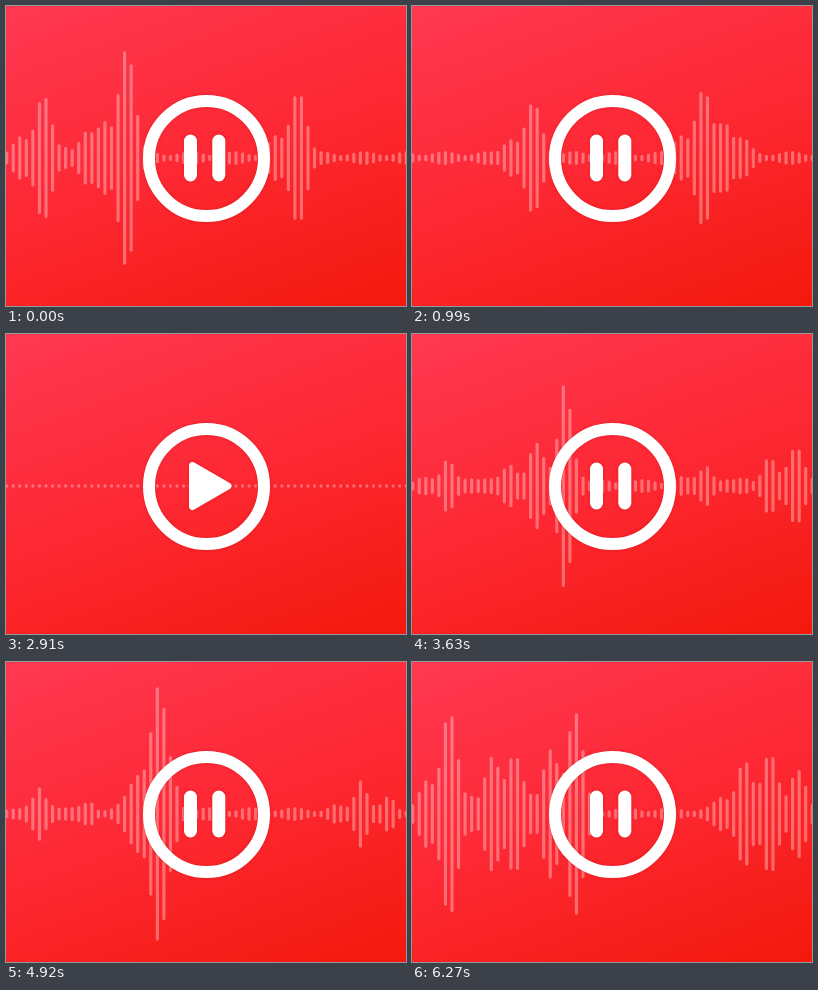
Animation of 400x300 px, one loop 6.3 s. Source, as an HTML page:

```html
<!DOCTYPE html>
<html lang="en">
<head>
<meta charset="utf-8">
<title>Audio button</title>
<style>
html, body { margin: 0; width: 100%; height: 100%; overflow: hidden; }
body { background: linear-gradient(160deg, #ff3852, #fd2833 50%, #f3190c); }
svg { display: block; width: 400px; height: 300px; }
.bars { stroke: #fff; stroke-opacity: .33; stroke-width: 3.2; stroke-linecap: round; }
.button { filter: drop-shadow(0 0 1.5px rgba(150, 0, 0, .3)); }
</style>
</head>
<body>
<svg viewBox="0 0 400 300">
  <path class="bars" id="bars"/>
  <g class="button">
    <circle cx="200.5" cy="152.5" r="57.5" fill="none" stroke="#fff" stroke-width="12"/>
    <path id="pause" d="M184.5 135v34M212.8 135v34" stroke="#fff" stroke-width="13" stroke-linecap="round"/>
    <path id="play" d="M186.5 131.5L222 152L186.5 172.5Z" fill="#fff" stroke="#fff" stroke-width="7" stroke-linejoin="round"/>
  </g>
</svg>
<script>
const LOOP = 6300, COUNT = 62, STEP = 6.55, MID = 152;
const WIDTH = 1.75, BEAT = 180;

// Key moments of the sound; each peak is [bar, level]
const moments = [
  { at: 0, peaks: [[5.6, 63], [12.3, 27], [18.3, 110], [44.5, 67]] },
  { at: 990, peaks: [[18.4, 56], [44.4, 68], [47.5, 36], [50.3, 20]] },
  { at: 1620, peaks: [[5.6, 108], [12, 40], [15.2, 90], [18.3, 98], [24, 26], [44.4, 87]] },
  { at: 4350, peaks: [[23.4, 137], [54.4, 36], [58.5, 17]] },
  { at: 5490, peaks: [[5.6, 68], [12, 30], [21, 52], [24.4, 102], [54.5, 38], [58.6, 19]] },
  { at: 6270, peaks: [[5.6, 103], [12.2, 54], [15.5, 60], [21, 56], [24.8, 102], [50.6, 50], [54.5, 60], [58.8, 44]] }
];

const bars = document.getElementById('bars');
const pause = document.getElementById('pause');
const play = document.getElementById('play');

const mix = (a, b, u) => a + (b - a) * u;
const ramp = (t, a, b) => {
  const u = Math.min(1, Math.max(0, (t - a) / (b - a)));
  return u * u * (3 - 2 * u);
};
const noise = n => {
  const v = Math.sin(n * 12.9898 + 4) * 43758.5453;
  return v - Math.floor(v);
};
const bell = x => Math.exp(-((x / WIDTH) ** 2));

// Each peak has a weaker echo a few bars to its left
const bump = (i, bar, level) => level * Math.hypot(bell(i - bar), .33 * bell(i - bar + 3.4));
const shape = (i, peaks) => Math.hypot(...peaks.map(([bar, level]) => bump(i, bar, level)));

function spectrum(t) {
  let k = moments.length - 2;
  while (k > 0 && moments[k].at > t) k--;
  const a = moments[k], b = moments[k + 1];
  const u = Math.min(1, (t - a.at) / (b.at - a.at));
  const loose = Math.sin(Math.PI * u);

  // Random beats land on the peaks of both neighbouring moments
  const n = Math.floor(t / BEAT);
  const choices = [...a.peaks, ...b.peaks];
  const [beatBar] = choices[Math.floor(noise(n) * choices.length)];
  const beatLevel = mix(40, 140, noise(n + 50)) * loose ** 2 * Math.sin(Math.PI * (t / BEAT - n));

  return i => {
    const dip = 1 - .6 * loose * Math.sin(t / 130 + i * .7) ** 2;
    const body = mix(shape(i, a.peaks), shape(i, b.peaks), u) * dip;
    const floor = 5 + 2 * Math.sin(i * .95 + t / 300);
    return Math.hypot(floor, body, bump(i, beatBar, beatLevel));
  };
}

function draw(t) {
  const level = spectrum(t);
  const gain = 1 - ramp(t, 1950, 2550) + ramp(t, 2940, 3200);
  let d = '';
  for (let i = 0; i < COUNT; i++) {
    const half = Math.max(.05, gain * level(i) - 1.6);
    const x = (.7 + i * STEP).toFixed(2);
    d += `M${x} ${(MID - half).toFixed(2)}V${(MID + half).toFixed(2)}`;
  }
  bars.setAttribute('d', d);
  const stopped = t >= 2490 && t < 2970;
  play.style.display = stopped ? '' : 'none';
  pause.style.display = stopped ? 'none' : '';
}

const start = performance.now();
function tick() {
  const t = (performance.now() - start) % LOOP;
  draw(Math.floor(t / 30) * 30);
  requestAnimationFrame(tick);
}
tick();
</script>
</body>
</html>
```
